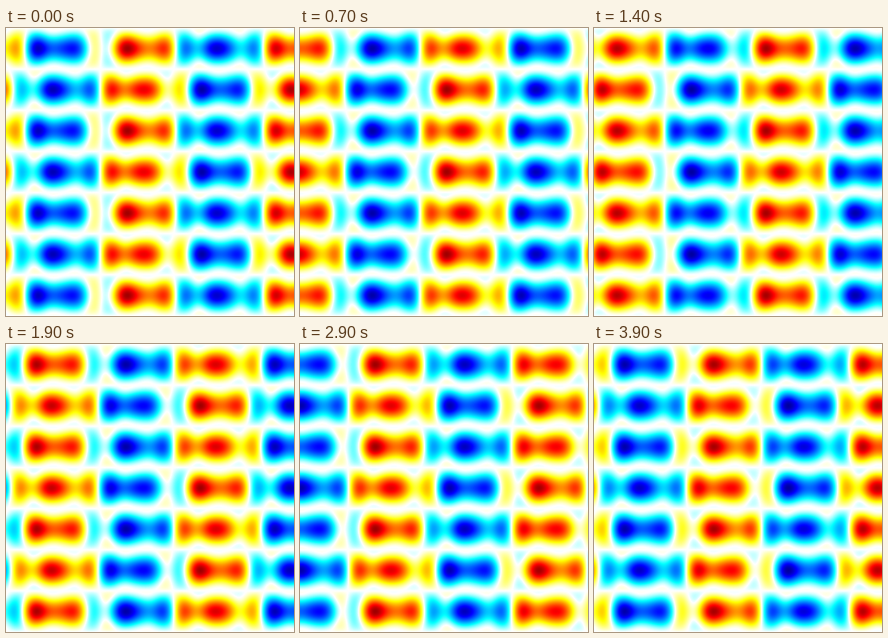
These frames come from a looping animation (360x360 px, 4 s). A matplotlib script:

```python
import numpy as np
import matplotlib.pyplot as plt
from matplotlib.animation import FuncAnimation
from matplotlib.colors import LinearSegmentedColormap

SIZE = 360
FRAMES = 40
INTERVAL = 100
ROWS = 7
LONG_WAVE = 200.0
SHORT_WAVE = 45.7

x = np.arange(SIZE) + 0.5
y = x[:, None]
stripes = np.sin(ROWS * np.pi * y / SIZE)

# jet with a white centre
cmap = LinearSegmentedColormap.from_list(
    "white_jet",
    [(0, "#000080"), (0.125, "#0000ff"), (0.375, "#00ffff"), (0.5, "#ffffff"),
     (0.625, "#ffff00"), (0.875, "#ff0000"), (1, "#800000")],
    N=512,
)


def field(frame):
    """Long wave equal in all rows plus a short wave alternating by row."""
    turn = 2 * np.pi * frame / FRAMES
    slow = 2 * np.pi * (x - 165) / LONG_WAVE - turn
    fast = 2 * np.pi * (x - 61) / SHORT_WAVE - turn
    long_part = 0.755 * np.cos(slow) + 0.07 * np.cos(3 * slow + 2.2)
    ripple = (0.235 - 0.11 * np.cos(2 * slow - 0.44)) * np.cos(fast)
    return stripes**2 * long_part + stripes * ripple


fig = plt.figure(figsize=(SIZE / 100, SIZE / 100), dpi=100)
ax = fig.add_axes([0, 0, 1, 1])
ax.axis("off")
image = ax.imshow(field(0), cmap=cmap, vmin=-1, vmax=1,
                  interpolation="nearest", aspect="auto")


def update(frame):
    image.set_data(field(frame))
    return (image,)


anim = FuncAnimation(fig, update, frames=FRAMES, interval=INTERVAL,
                     repeat=True, repeat_delay=0, blit=False)
plt.show()
```
